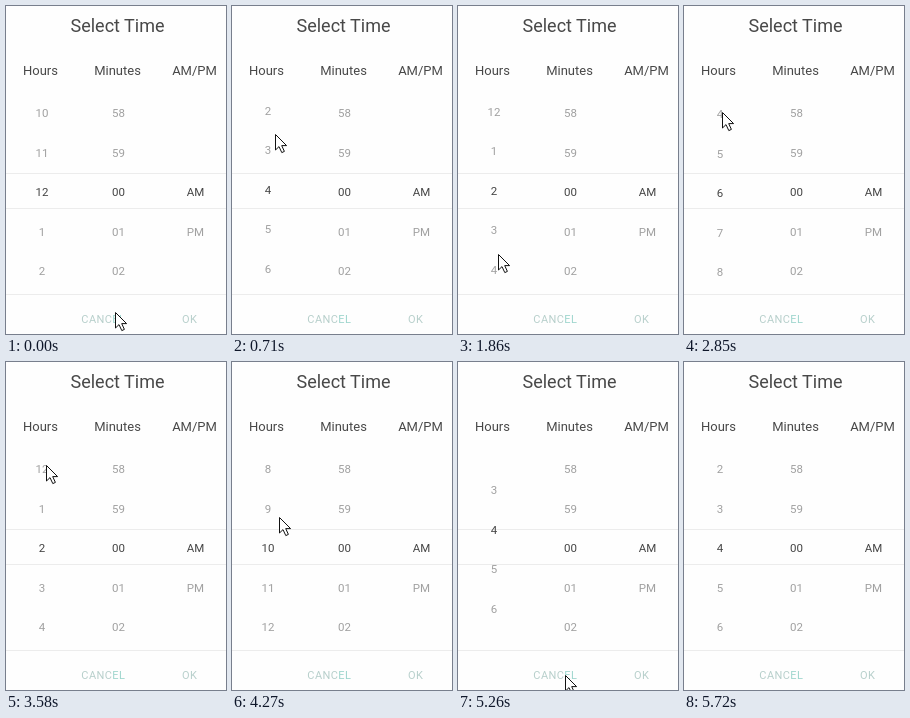
An HTML page that plays this animation: 220 px wide and 328 px high, repeating every 6.12 s.

```html
<!DOCTYPE html>
<html lang="en">
<head>
<meta charset="utf-8">
<title>Select Time</title>
<style>
  html, body { margin: 0; width: 100%; height: 100%; overflow: hidden; background: #fefefe; }
  svg { display: block; width: 220px; height: 328px; }
  text { font-family: Roboto, Arial, sans-serif; text-anchor: middle; fill: #484848; }
  .title { font-size: 18px; }
  .head { font-size: 13px; }
  .item { font-size: 11.5px; fill: #a0a0a0; }
  .on { fill: #444; }
  .button { font-size: 11px; letter-spacing: .4px; fill: #b7cfcb; }
  .bright { fill: #9fd6ce; }
  .line { fill: #ececec; }
</style>
</head>
<body>
<svg viewBox="0 0 220 328">
  <defs><clipPath id="window"><rect y="95" width="220" height="180"/></clipPath></defs>
  <rect width="220" height="328" fill="#fefefe"/>
  <text class="title" x="111.5" y="26">Select Time</text>
  <text class="head" x="34.5" y="68.5">Hours</text>
  <text class="head" x="111.5" y="68.5">Minutes</text>
  <text class="head" x="188.5" y="68.5">AM/PM</text>
  <rect class="line" y="167" width="220" height="1"/>
  <rect class="line" y="202" width="220" height="1"/>
  <rect class="line" y="288" width="220" height="1"/>
  <g id="fixed"></g>
  <g id="hours" clip-path="url(#window)"></g>
  <text class="button" x="97.3" y="317">CANC<tspan class="bright">EL</tspan></text>
  <text class="button" x="183.7" y="317">OK</text>
  <path id="cursor" d="M.5 .5V16L4 12.6L6.8 18.6L9.4 17.4L6.7 11.6H11.6Z" fill="#fff" stroke="#111"/>
</svg>
<script>
const LOOP = 6120, ROW = 39.5, MID = 186, RETURN = 400;
const CANCEL = [107, 313];

// Each swipe drags the pointer, then the wheel coasts by a number of rows.
const swipes = [
  { at: 430, drag: 200, coast: 660, rows: 5, from: [32, 238], to: [45, 98] },
  { at: 1200, drag: 120, coast: 660, rows: 9, from: [37, 245], to: [50, 98] },
  { at: 1860, drag: 260, coast: 460, rows: 4, from: [40, 249], to: [42, 98] },
  { at: 2850, drag: 300, coast: 400, rows: -4, from: [38, 105], to: [40, 274] },
  { at: 3640, drag: 360, coast: 400, rows: -4, from: [40, 103], to: [44, 268] },
  { at: 4730, drag: 130, coast: 922, rows: -6, from: [48, 101], to: [46, 268] }
];

const legs = [
  { at: 70, time: 110, to: swipes[0].from },
  ...swipes.flatMap((s, i) => [
    { at: s.at, time: s.drag, to: s.to },
    { at: s.at + s.drag, time: RETURN, to: i + 1 < swipes.length ? swipes[i + 1].from : CANCEL }
  ]),
  { at: 5320, time: RETURN, to: [162, 330] }
];

const progress = (t, at, time) => Math.min(1, Math.max(0, (t - at) / time));
const easeOut = u => 1 - (1 - u) ** 3;

function addText(parent, x, y, label) {
  const el = document.createElementNS("http://www.w3.org/2000/svg", "text");
  el.setAttribute("x", x);
  el.setAttribute("y", y + 4);
  el.setAttribute("class", "item");
  el.textContent = label;
  parent.appendChild(el);
  return el;
}

const fixed = document.getElementById("fixed");
const hours = document.getElementById("hours");
const cursor = document.getElementById("cursor");

["58", "59", "00", "01", "02"].forEach((label, i) => {
  addText(fixed, 112.5, MID + (i - 2) * ROW, label).classList.toggle("on", i === 2);
});
addText(fixed, 189.5, MID, "AM").classList.add("on");
addText(fixed, 189.5, MID + ROW, "PM");
const rows = Array.from({ length: 7 }, () => addText(hours, 36, 0, ""));

function drawWheel(t) {
  const pos = swipes.reduce((sum, s) => sum + s.rows * easeOut(progress(t, s.at, s.coast)), 0);
  const near = Math.round(pos);
  rows.forEach((el, i) => {
    const n = near + i - 3;
    el.textContent = (n + 23) % 12 + 1;
    el.setAttribute("y", MID + (n - pos) * ROW + 4);
    el.classList.toggle("on", n === near);
  });
}

function drawCursor(t) {
  let x = 109, y = 306;
  for (const leg of legs) {
    const u = progress(t, leg.at, leg.time);
    x += (leg.to[0] - x) * u;
    y += (leg.to[1] - y) * u;
  }
  cursor.setAttribute("transform", `translate(${Math.round(x)} ${Math.round(y)})`);
}

const start = performance.now();
function frame() {
  const t = (performance.now() - start) % LOOP;
  drawWheel(t);
  drawCursor(t);
  requestAnimationFrame(frame);
}
frame();
</script>
</body>
</html>
```
